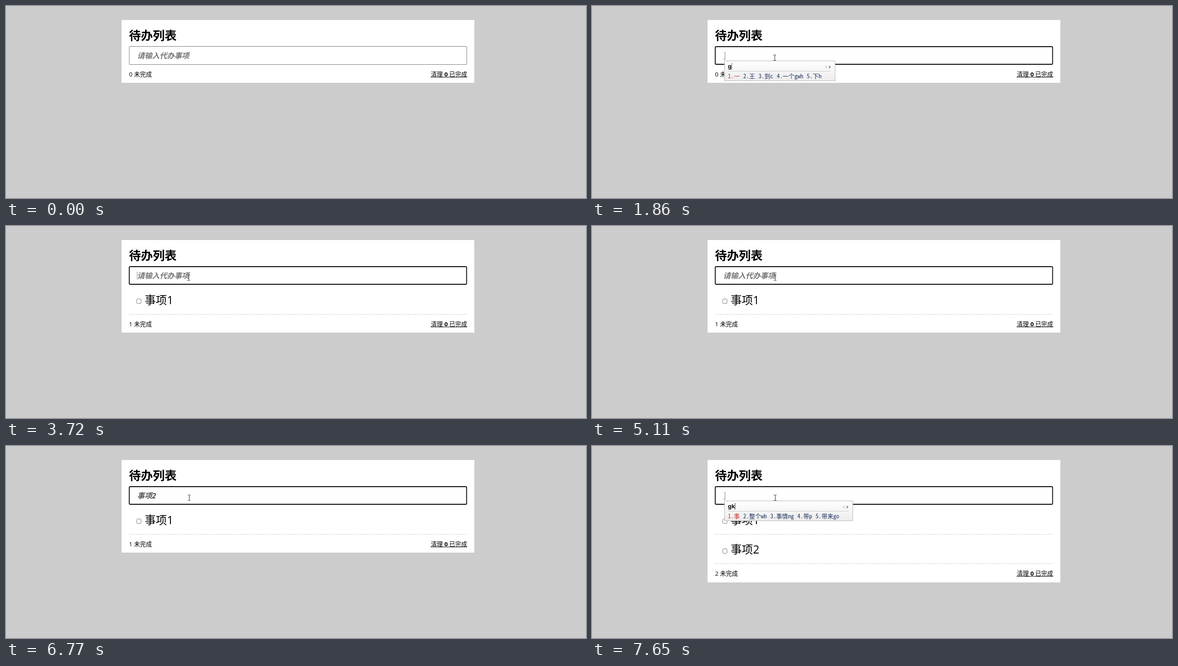
These frames come from a looping animation (1280 px wide and 425 px high, 8000 ms). An HTML page:

```html
<!DOCTYPE html>
<html lang="zh-CN">
<head>
<meta charset="utf-8">
<style>
  html, body { margin: 0; width: 100%; height: 100%; overflow: hidden; background: #ccc; }
  svg { display: block; width: 1280px; height: 425px; }
  text { font: 13.12px "Open Sans", "Noto Sans CJK SC", "Noto Sans CJK", sans-serif; white-space: pre; }
  .title { font-size: 26.24px; font-weight: bold; }
  .field { font-size: 16.4px; font-weight: bold; font-style: italic; }
  .item { font-size: 24.6px; }
  .code { font: bold 13px "Liberation Sans", sans-serif; }
  .pick { font: 13px "Noto Sans Mono CJK SC", "Noto Sans CJK SC", "Noto Sans CJK", monospace; }
</style>
</head>
<body>
<svg id="stage" viewBox="0 0 1280 425">
  <defs>
    <linearGradient id="panel" x2="0" y2="1">
      <stop stop-color="#fff"/><stop offset="1" stop-color="#ececec"/>
    </linearGradient>
  </defs>
  <g id="scene"></g>
</svg>
<script>
const LOOP = 8000, ROW = 65.6;
const scene = document.getElementById('scene');

const candidates = {
  g: ['一', '王', '到c', '一个gwh', '下h'],
  gk: ['事', '整个wh', '事情ng', '带p', '带来go'],
  gka: ['事项d', '开工a', '带工s', '整形k', '事业f'],
};

// Each step overrides part of the state from its time on.
const steps = [
  [0, { value: '', code: '', caret: false, items: 0, focus: false }],
  [780, { focus: true, caret: true }],
  [1330, { caret: false }],
  [1860, { code: 'g' }],
  [2000, { code: 'gk' }],
  [2170, { code: 'gka' }],
  [2230, { code: '', value: '事项', caret: true }],
  [2480, { value: '事项1' }],
  [3010, { caret: false }],
  [3570, { caret: true }],
  [3720, { value: '', items: 1 }],
  [4100, { caret: false }],
  [4580, { caret: true }],
  [5110, { caret: false }],
  [5200, { code: 'g' }],
  [5280, { code: 'gk' }],
  [5580, { code: '', value: '事项', caret: true }],
  [6130, { caret: false }],
  [6220, { value: '事项2', caret: true }],
  [6770, { caret: false }],
  [6830, { value: '', items: 2 }],
  [7230, { caret: true }],
  [7550, { code: 'g' }],
  [7650, { code: 'gk' }],
];

const text = (x, y, str, cls = '', extra = '') => `<text x="${x}" y="${y}" class="${cls}" ${extra}>${str}</text>`;
const path = (d, stroke, extra = '') => `<path d="${d}" fill="none" stroke="${stroke}" ${extra}/>`;
const rect = (x, y, w, h, fill, extra = '') => `<rect x="${x}" y="${y}" width="${w}" height="${h}" fill="${fill}" ${extra}/>`;

function pointerAt(t) {
  if (t < 70) return null;
  if (t < 920) {
    const p = Math.min(7, Math.floor((t - 70) / 75.7)) / 7;
    const left = (1 - p) ** 2;
    return { x: Math.round(402 + 618 * left), y: Math.round(114 + 243 * left) };
  }
  return { x: t < 4500 ? 403 : 404, y: 114 };
}

const inField = p => p && p.y < 130;

function pointer(p) {
  if (!p) return '';
  if (inField(p)) {
    const { x, y } = p;
    return path(`M${x - 3} ${y - 5.5}h2.5m1 0h2.5M${x - 3} ${y + 6.5}h2.5m1 0h2.5M${x + .5} ${y - 5}v11`, '#222');
  }
  return `<path transform="translate(${p.x} ${p.y})" fill="#fff" stroke="#000"
    d="M.5 .5V16.5L4.2 13L6.6 18.5L9 17.5L6.6 12.2H11.5Z"/>`;
}

function inputPanel(code) {
  let x = 300, picks = '';
  candidates[code].forEach((word, i) => {
    const label = `${i + 1}.${word}`;
    picks += text(x, 160, label, 'pick', `fill="${i ? '#1f3260' : '#c8302c'}"`);
    for (const ch of label) x += ch > '\xff' ? 13 : 6.5;
    x += 7.75;
  });
  const right = Math.round(x + 22.6);
  const caretX = 308.5 + (code.length - 1) * 7.3;
  return path('M290 118.5H293.5V101', '#777')
    + rect(292.5, 121.5, right - 293, 44, 'url(#panel)', 'stroke="#b4b4b4"')
    + text(300, 138, code, 'code')
    + path(`M${caretX} 126V141`, code === 'g' ? '#2a8a3a' : '#333')
    + path(`M300 144.5H${right - 10}`, '#ccc')
    + `<path d="M${right - 19} 131.5v7l-4 -3.5z" fill="#ccc"/>`
    + `<path d="M${right - 14} 131.5v7l4 -3.5z" fill="#888"/>`
    + picks;
}

function field(s, hover) {
  let out = s.focus
    ? rect(272, 90, 744.5, 39, '#fff', 'rx="2" stroke="#000" stroke-width="1.8"')
    : rect(272, 89.5, 745, 40, '#fff', `rx="1.5" stroke="${hover ? '#4f4f4f' : '#767676'}"`);
  if (s.code) return out;
  out += s.value
    ? text(289.5, 116.3, s.value, 'field', 'fill="#555"')
    : text(289.5, 116, '请输入代办事项', 'field', 'fill="#757575"');
  if (s.caret) out += path(`M${[289.5, , 322.5, 331.5][s.value.length]} 101V119`, '#888');
  return out;
}

function item(i) {
  const y = i * ROW, line = Math.floor(195 + y) + .5;
  return rect(288.5, Math.round(161 + y) + .5, 9.5, 10, '#fff', 'rx="2" stroke="#767676"')
    + text(306, 172.6 + y, '事项' + (i + 1), 'item')
    + path(`M272 ${line}H1017.5`, '#c4c4c4', 'stroke-dasharray="3 2"');
}

function draw(t) {
  const s = Object.assign({}, ...steps.filter(step => step[0] <= t).map(step => step[1]));
  const p = pointerAt(t), shift = s.items * ROW, base = 156 + shift;
  let out = rect(255, 31, 778.5, Math.round(170.4 + shift) - 31, '#fff')
    + text(271.6, 75.3, '待办列表', 'title')
    + field(s, inField(p));
  for (let i = 0; i < s.items; i++) out += item(i);
  out += text(271.6, base, s.items + ' 未完成')
    + text(1017.6, base, '清理 <tspan font-weight="bold">0</tspan> 已完成', '', 'text-anchor="end"')
    + rect(937, Math.round(base + 1), 81, 1, '#000');
  if (s.code) out += inputPanel(s.code);
  return out + pointer(p);
}

let shown = '';
function tick() {
  const next = draw(performance.now() % LOOP);
  if (next !== shown) scene.innerHTML = shown = next;
  requestAnimationFrame(tick);
}
tick();
</script>
</body>
</html>
```
